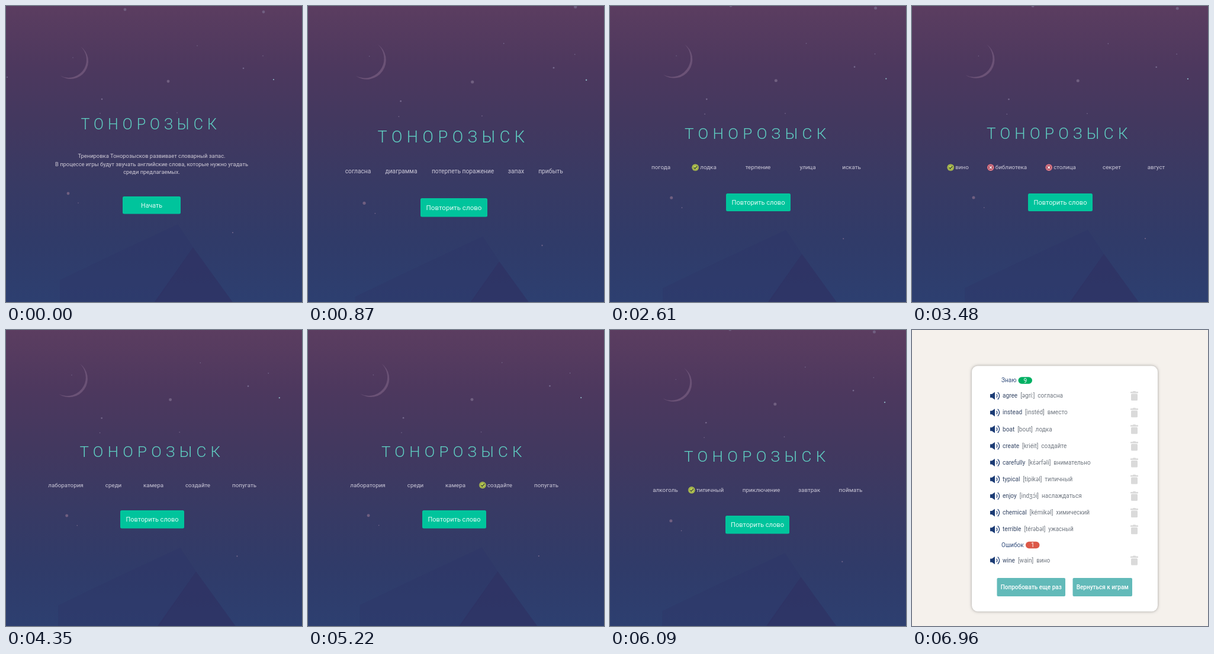
An HTML page with a canvas for the animation above (7.83 s loop, 500x499 px).

```html
<!DOCTYPE html>
<html lang="ru">
<head>
<meta charset="utf-8">
<title>Тренировка слов</title>
<style>
html, body { margin: 0; width: 100%; height: 100%; overflow: hidden; background: #3d3a62; }
canvas { display: block; width: 500px; height: 499px; }
</style>
</head>
<body>
<canvas id="stage" width="500" height="499"></canvas>
<script>
const ctx = document.getElementById('stage').getContext('2d');
const W = 500, H = 499, STEP = 870;
const FONT = 'Roboto, sans-serif';
const TITLE = 'ТОНОРОЗЫСК';

// view: [scale, dx, dy]; title: [x, baseline, size]; button: [x, y, w, h]
// words: [text, centre x, mark]
const scenes = [
  { view: [1, 0, 0], title: [126.5, 208, 25], button: [197, 321, 98, 29.5], label: 'Начать', labelSize: 10.7,
    lines: ['Тренировка Тонорозысков развивает словарный запас.',
      'В процессе игры будут звучать английские слова, которые нужно угадать',
      'среди предлагаемых.'] },
  { view: [1.081, -18.5, -9.3], title: [117.5, 229.5, 27.1], button: [190, 324, 113, 31.5], labelSize: 11.6,
    rowY: 279, size: 10.25,
    words: [['согласна', 84.5], ['диаграмма', 157.5], ['потерпеть поражение', 261.5], ['запах', 351.5], ['прибыть', 410]] },
  { view: [1.06, -12, -8], title: [122, 226.5, 26.5], button: [193, 319, 111, 31], labelSize: 11.3,
    rowY: 275, size: 10,
    words: [['рисовать', 84], ['вместо', 162, 'ok'], ['обещание', 247], ['ветер', 329], ['кухня', 402]] },
  { view: [1.045, -6, -7], title: [126, 224, 26.1], button: [196, 316, 109, 30], labelSize: 11.1,
    rowY: 272, size: 9.9,
    words: [['погода', 86], ['лодка', 166, 'ok'], ['терпение', 250], ['улица', 334], ['искать', 408]] },
  { view: [1.043, -5.5, -6.5], title: [126, 224, 26], button: [196, 316, 109, 30], labelSize: 11.1,
    rowY: 272, size: 9.8,
    words: [['вино', 84.5, 'ok'], ['библиотека', 167.5, 'no'], ['столица', 258, 'no'], ['секрет', 337.5], ['август', 412.5]] },
  { view: [1.035, -6, -14], title: [124.5, 214, 25.9], button: [193, 304, 108, 30.5], labelSize: 11,
    rowY: 261.3, size: 9.8,
    words: [['лаборатория', 101], ['среди', 181.5], ['камера', 249], ['создайте', 324], ['попугать', 402.5]] },
  { view: [1.035, -6.6, -14.3], title: [124, 214, 25.9], button: [193, 304, 108, 30.5], labelSize: 11,
    rowY: 261.3, size: 9.8,
    words: [['лаборатория', 101], ['среди', 181.5], ['камера', 249], ['создайте', 324, 'ok'], ['попугать', 402.5]] },
  { view: [1.041, -6.4, -7.2], title: [125, 222, 26.1], button: [195, 313, 108, 30.5], labelSize: 11.1,
    rowY: 269.7, size: 9.9,
    words: [['алкоголь', 93.5], ['типичный', 169, 'ok'], ['приключение', 255.5], ['завтрак', 336.5], ['поймать', 406.5]] }
];

const stars = [[201, 6, 2.4], [435, 10, 2.4], [323, 67, .8], [113, 87, .7], [401, 105, 1.3],
  [434, 84, .8], [274, 127, 2.4], [162, 157, 1.3], [159, 181, .8], [289, 180, .8],
  [105, 316, 2.4], [122, 332, .8], [383, 382, 1], [2, 120, 1]];

const known = [['agree', 'əgríː', 'согласна'], ['instead', 'instéd', 'вместо'], ['boat', 'bout', 'лодка'],
  ['create', 'kriéit', 'создайте'], ['carefully', 'kέərfəli', 'внимательно'], ['typical', 'típikəl', 'типичный'],
  ['enjoy', 'indʒɔ́i', 'наслаждаться'], ['chemical', 'kémikəl', 'химический'], ['terrible', 'térəbəl', 'ужасный']];

function text(str, x, y, size, color, align = 'left', weight = 400) {
  ctx.font = `${weight} ${size}px ${FONT}`;
  ctx.fillStyle = color;
  ctx.textAlign = align;
  ctx.fillText(str, x, y);
  return ctx.measureText(str).width;
}

function box(x, y, w, h, r, color) {
  ctx.fillStyle = color;
  ctx.beginPath();
  ctx.roundRect(x, y, w, h, r);
  ctx.fill();
}

function dot(x, y, r, color) {
  ctx.fillStyle = color;
  ctx.beginPath();
  ctx.arc(x, y, r, 0, 7);
  ctx.fill();
}

function shape(points, color) {
  ctx.fillStyle = color;
  ctx.beginPath();
  points.forEach(p => ctx.lineTo(...p));
  ctx.closePath();
  ctx.fill();
}

function line(points, width, color) {
  ctx.strokeStyle = color;
  ctx.lineWidth = width;
  ctx.beginPath();
  points.forEach((p, i) => i ? ctx.lineTo(...p) : ctx.moveTo(...p));
  ctx.stroke();
}

function moon(x, y, r, depth) {
  const tilt = 35 * Math.PI / 180;
  ctx.save();
  ctx.translate(x, y);
  ctx.rotate(tilt);
  ctx.fillStyle = '#6b5276';
  ctx.beginPath();
  ctx.arc(0, 0, r, -Math.PI / 2, Math.PI / 2);
  const a = Math.atan2(r, depth);
  ctx.arc(-depth, 0, Math.hypot(r, depth), a, -a, true);
  ctx.fill();
  ctx.restore();
}

function night([scale, dx, dy]) {
  const sky = ctx.createLinearGradient(0, 0, 0, H);
  ['#5b3d60', '#4d385e', '#42385f', '#383a64', '#303b69', '#2d3f70']
    .forEach((c, i) => sky.addColorStop(i / 5, c));
  ctx.fillStyle = sky;
  ctx.fillRect(0, 0, W, H);
  ctx.save();
  ctx.translate(dx, dy);
  ctx.scale(scale, scale);
  shape([[91, 520], [91, 462], [185, 417], [290, 368], [316, 407], [240, 520]], 'rgba(47,54,102,.4)');
  shape([[316, 407], [398, 520], [236, 520]], 'rgba(47,48,98,.6)');
  moon(109, 93, 30, 4);
  stars.forEach(([x, y, r]) => dot(x, y, r, r > 2 ? '#705f80' : '#75688c'));
  dot(452, 124, 1.1, '#8fb6c4');
  ctx.restore();
}

function mark(x, y, kind) {
  const ok = kind === 'ok';
  dot(x, y, 5.8, ok ? '#b9cb50' : '#dd6575');
  dot(x, y, 4.5, ok ? '#59603f' : '#f0ccd2');
  dot(x, y, 4, ok ? '#b9cb50' : '#a84355');
  if (ok) {
    line([[x - 2.5, y], [x - .6, y + 2], [x + 3, y - 2]], 1.3, '#39423f');
  } else {
    line([[x - 2, y - 2], [x + 2, y + 2]], 1.3, '#fff');
    line([[x + 2, y - 2], [x - 2, y + 2]], 1.3, '#fff');
  }
}

function game(s) {
  night(s.view);
  const [tx, ty, ts] = s.title;
  ctx.letterSpacing = ts * .28 + 'px';
  text(TITLE, tx, ty, ts, '#5fcfc2', 'left', 300);
  ctx.letterSpacing = '0px';
  (s.lines || []).forEach((l, i) => text(l, 246, 256.4 + i * 13.4, 9.4, '#cfcad6', 'center'));
  (s.words || []).forEach(([w, x, kind]) => {
    const width = text(w, x, s.rowY + 3.4, s.size, '#cbc8d8', 'center');
    if (kind) mark(x - width / 2 - 8, s.rowY + .2, kind);
  });
  const [x, y, w, h] = s.button;
  box(x, y, w, h, 2.5, '#00c49c');
  text(s.label || 'Повторить слово', x + w / 2, y + h / 2 + 3.8, s.labelSize, '#e2fbf5', 'center');
}

function speaker(y) {
  const c = '#1b3b74';
  shape([[132, y - 3], [135, y - 3], [140, y - 6.5], [140, y + 6.5], [135, y + 3], [132, y + 3]], c);
  ctx.strokeStyle = c;
  ctx.lineWidth = 1.3;
  [[3.8, .8], [7.6, .9]].forEach(([r, a]) => {
    ctx.beginPath();
    ctx.arc(140, y, r, -a, a);
    ctx.stroke();
  });
}

function trash(y) {
  const c = '#dadada';
  box(373, y - 8, 5, 2, 1, c);
  box(369, y - 7, 13, 2.5, .5, c);
  box(370, y - 3.5, 11, 11.5, 1.5, c);
}

function row([word, sound, meaning], y) {
  speaker(y);
  let x = 153;
  x += text(word, x, y + 3.2, 10.1, '#364766') + 5;
  x += text(`[${sound}]`, x, y + 3.2, 10, '#707780') + 5;
  text(meaning, x, y + 3.2, 10, '#707780');
  trash(y);
}

function badge(label, count, x, y, color) {
  text(label, 151, y + 3.2, 10.1, '#324d7c');
  box(x, y - 5.7, 23.5, 11.4, 5.7, color);
  text(count, x + 11.7, y + 3.7, 10, '#fff', 'center');
}

function results() {
  ctx.fillStyle = '#f5f1ec';
  ctx.fillRect(0, 0, W, H);
  ctx.save();
  ctx.shadowColor = 'rgba(0,0,0,.35)';
  ctx.shadowBlur = 5;
  box(101, 60.5, 314, 414, 10, '#fff');
  ctx.restore();
  badge('Знаю', '9', 179.5, 85, '#00b063');
  known.forEach((k, i) => row(k, 111 + i * 28.15));
  badge('Ошибок', '1', 192, 362.5, '#dc5848');
  row(['wine', 'wain', 'вино'], 388.5);
  [['Попробовать еще раз', 143.5, 115.5], ['Вернуться к играм', 271.5, 100.5]].forEach(([label, x, w]) => {
    box(x, 418, w, 31, 2, '#62bab9');
    text(label, x + w / 2, 436.8, 10, '#fff', 'center', 500);
  });
}

function frame() {
  const i = Math.floor(performance.now() / STEP) % (scenes.length + 1);
  if (i < scenes.length) game(scenes[i]);
  else results();
  requestAnimationFrame(frame);
}
frame();
</script>
</body>
</html>
```
